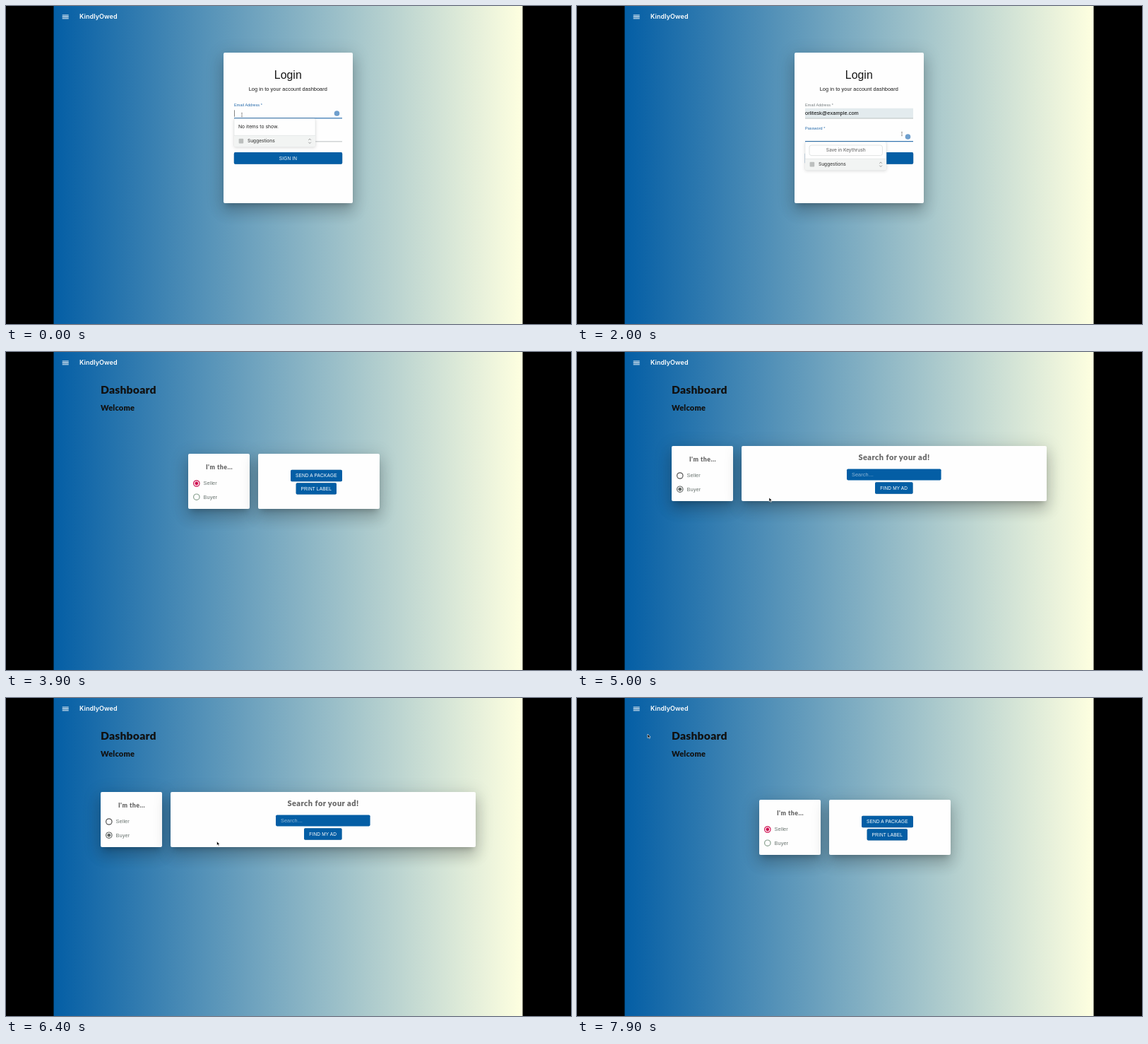
These frames come from a looping animation (800 by 450 pixels, 8000 ms). An HTML page:

```html
<!DOCTYPE html>
<html lang="en">
<head>
<meta charset="utf-8">
<title>Login and dashboard</title>
<style>
html, body { margin: 0; width: 100%; height: 100%; overflow: hidden; }
#page { position: absolute; inset: 0;
  background: linear-gradient(90deg, #000 67px, #045ea5 68px, #feffe0 731px, #000 732px); }
.card { position: absolute; background: #fefefe; border-radius: 2px;
  box-shadow: 0 5.5px 7.5px -3.5px rgba(0,0,0,.2), 0 12px 19px 1.5px rgba(0,0,0,.14), 0 4.5px 23px 4px rgba(0,0,0,.12); }
svg { position: absolute; left: 0; top: 0; }
text { font: 7.35px "Liberation Sans", Arial, sans-serif; letter-spacing: .07px; fill: #151515; }
.mid { text-anchor: middle; }
.head { font: 900 15.7px Lato, sans-serif; fill: #111; letter-spacing: .2px; }
.sub { font-size: 11px; }
.grey { fill: #666; letter-spacing: .45px; }
.label { font-size: 5.5px; }
.btn rect { fill: #045ea5; filter: drop-shadow(0 .5px .7px rgba(0,0,0,.3)); }
.btn text { font-size: 6.5px; letter-spacing: .18px; fill: #fff; text-anchor: middle; }
.pop text { font: 500 6.5px Inter, sans-serif; letter-spacing: 0; fill: #444; }
.pop #noItems { font-weight: 400; font-size: 6.8px; fill: #222; }
.pop > rect:first-child { filter: drop-shadow(0 1px 2px rgba(0,0,0,.14)); }
.choice { fill: #68736f; }
</style>
</head>
<body>
<div id="page"></div>
<div id="cards"></div>
<svg width="800" height="450" viewBox="0 0 800 450">
  <path d="M79.7 13h9M79.7 15.4h9M79.7 17.8h9" stroke="#fff" stroke-width="1.1"/>
  <text x="104" y="18.2" style="font:600 9px Inter,sans-serif;fill:#fff">KindlyOwed</text>

  <g id="login">
    <text class="mid" x="399.3" y="103.2" style="font-size:15.8px">Login</text>
    <text class="mid" x="399.3" y="120.4">Log in to your account dashboard</text>
    <rect id="filled" x="323" y="144.7" width="153" height="14" fill="#e3ebee"/>
    <text class="label" id="emailLabel" x="323" y="142.4">Email Address *</text>
    <text id="email" x="323" y="154.4" style="fill:#000">orlitesk@example.com</text>
    <rect id="emailLine" x="323" width="153"/>
    <text class="label" id="passLabel" x="323" y="175.4">Password *</text>
    <text id="pass" x="323" y="187.6"></text>
    <rect id="passLine" x="323" width="153"/>
    <g class="btn"><rect x="322.8" y="207.1" width="153.4" height="16.6" rx="1.8"/><text x="399.5" y="217.8">SIGN IN</text></g>
    <rect id="caret" width=".8" height="9.5" fill="#666"/>
    <g id="helper">
      <circle cx="468.5" cy="152" r="3.8" fill="#6f9fcd"/>
      <g class="pop">
        <rect x="323" y="159.5" width="115" height="39.8" rx="2" fill="#fefefe" stroke="#dfe3e3" stroke-width=".5"/>
        <path d="M323.3 183.3h114.4v14a1.8 1.8 0 0 1-1.8 1.8H325.1a1.8 1.8 0 0 1-1.8-1.8z" fill="#f2f4f3"/>
        <path d="M323 183.3h115" stroke="#d9dddd" stroke-width=".6"/>
        <rect x="329.6" y="187.8" width="6.6" height="6.6" rx="1" fill="#bcbfbe"/>
        <text x="342" y="193.4">Suggestions</text>
        <path d="M428.3 189.8l1.8-1.9 1.8 1.9M428.3 192.6l1.8 1.9 1.8-1.9" fill="none" stroke="#777" stroke-width=".7"/>
        <text id="noItems" x="329" y="173.4">No items to show.</text>
        <g id="save">
          <rect id="saveBox" x="329" y="164" width="103.5" height="14.6" rx="3"/>
          <text id="saveText" class="mid" x="380.7" y="173.4">Save in Keythrush</text>
        </g>
      </g>
    </g>
  </g>

  <g id="dash">
    <text class="head" x="134" y="59">Dashboard</text>
    <text class="head sub" x="134" y="82.6">Welcome</text>
    <g id="role">
      <text class="head grey mid" x="302" y="166" style="font-size:8.8px">I'm the...</text>
      <circle id="halo" cx="269.8" cy="186" r="9" fill="#000" opacity=".04"/>
      <g id="radios" fill="none" stroke-width="1.2">
        <circle cx="269.8" cy="186" r="4.2"/><circle cx="269.8" cy="205.2" r="4.2"/>
      </g>
      <circle id="dot" cx="269.8" r="2.4"/>
      <text class="choice" x="279.6" y="188.4">Seller</text>
      <text class="choice" x="279.6" y="207.6">Buyer</text>
    </g>
    <g id="seller" class="btn">
      <rect x="403" y="166.7" width="73" height="16.6" rx="1.8"/><text x="439.3" y="177.3">SEND A PACKAGE</text>
      <rect x="410.6" y="185.2" width="57.4" height="16.4" rx="1.8"/><text x="439.3" y="195.7">PRINT LABEL</text>
    </g>
    <g id="buyer">
      <text class="head sub grey mid" x="449" y="152.8">Search for your ad!</text>
      <rect x="382" y="165.4" width="133.6" height="16" rx="1.8" fill="#045ea5"/>
      <text x="389" y="175.8" style="fill:#8fb6d6">Search…</text>
      <g class="btn"><rect x="422" y="184.2" width="53.6" height="16.6" rx="1.8"/><text x="448.8" y="194.8">FIND MY AD</text></g>
    </g>
  </g>

  <g id="pointer">
    <path id="arrow" d="M0 0v5.6l1.4-1.2 1 2.1 1-.5-1-2h1.7z" fill="#000" stroke="#fff" stroke-width=".6"/>
    <path id="beam" d="M-.8-2.6h1.6M0-2.6v5.2M-.8 2.6h1.6" fill="none" stroke="#777" stroke-width=".7"/>
    <path id="hand" d="M-.5-2.5q.8-.9 1.2.2v1.9l2.4.7q.8.4.5 1.6l-.6 2.4H0L-2 1.6q.2-1 1.5-.1z" fill="#fff" stroke="#222" stroke-width=".7"/>
  </g>
</svg>
<script>
const LOOP = 8000, FILL = 400, FOCUS_PASS = 1500, SIGNED_IN = 3700, BUYER = 5000, SELLER = 7200;
const BLUE = '#1f66a8';
const $ = id => document.getElementById(id);
const show = (id, on) => { $(id).style.display = on ? '' : 'none'; };
const set = (id, attrs) => { for (const k in attrs) $(id).setAttribute(k, attrs[k]); };

// time, x, y of the pointer, eased between stops
const path = [
  [0, 334, 154], [300, 334, 154], [700, 340, 172], [1000, 344, 172], [1500, 460, 181], [4000, 460, 181],
  [4800, 271, 206], [5200, 273, 206], [5700, 288, 211], [6300, 310, 205], [6900, 155, 177],
  [7200, 155, 177], [7900, 100, 51], [8000, 100, 51]
];
function pointerAt(t) {
  const i = path.findIndex(p => p[0] > t), a = path[i - 1], b = path[i];
  let k = (t - a[0]) / (b[0] - a[0]);
  k = k * k * (3 - 2 * k);
  return [a[1] + (b[1] - a[1]) * k, a[2] + (b[2] - a[2]) * k];
}

const bursts = [[2100, 2500], [2700, 3000], [3300, 3500]];
const typedAt = t => bursts.reduce((n, [from, to]) =>
  n + (t < from ? 0 : Math.floor((Math.min(t, to) - from) / 100) + 1), 0);

function card(x, y, w, h) {
  return `<div class="card" style="left:${x}px;top:${y}px;width:${w}px;height:${h}px"></div>`;
}
const layouts = {
  login: card(308, 66, 183, 213),
  seller: card(258, 144, 87, 78) + card(357, 144, 172, 78),
  buyer: card(134, 133, 87, 78) + card(233, 133, 432, 78)
};
let layout;

function underline(id, bottom, focused) {
  const h = focused ? 1.1 : .6;
  set(id, { y: bottom - h, height: h, fill: focused ? BLUE : '#8b9496' });
}

function drawLogin(t, x, y) {
  const onPass = t >= FOCUS_PASS, filled = t >= FILL, typed = typedAt(t);
  const hover = !onPass && filled && y > 163 && y < 179 && x < 433;
  show('filled', filled);
  show('email', filled);
  $('emailLabel').style.fill = onPass ? '#737b7d' : BLUE;
  $('passLabel').style.fill = BLUE;
  show('passLabel', onPass);
  underline('emailLine', 159.3, !onPass);
  underline('passLine', 192.2, onPass);
  $('pass').textContent = '•'.repeat(typed);
  show('noItems', !filled);
  show('save', filled);
  set('saveBox', hover ? { fill: '#3d82c1', stroke: '#1c66ac', 'stroke-width': 1.2 }
                       : { fill: '#fefefe', stroke: '#d6dada', 'stroke-width': .7 });
  $('saveText').style.fill = hover ? '#e6f0f8' : '#707070';
  set('helper', { transform: `translate(0 ${onPass ? 33 : 0})` });

  const since = t - (onPass ? FOCUS_PASS : filled ? FILL : 0);
  show('caret', typed > 0 || since % 1000 < 500);
  const width = onPass ? (typed ? $('pass').getComputedTextLength() : 0)
                       : (filled ? $('email').getComputedTextLength() : 0);
  set('caret', { x: 323 + width, y: onPass ? 180.5 : 147.3 });
}

function drawDashboard(buying, hover) {
  show('seller', !buying);
  show('buyer', buying);
  show('halo', hover);
  set('halo', { cy: buying ? 186 : 205.2 });
  set('role', { transform: buying ? 'translate(-124 -11)' : '' });
  const [first, second] = $('radios').children;
  first.setAttribute('stroke', buying ? '#555' : '#cf0f50');
  second.setAttribute('stroke', buying ? '#606664' : '#87a08e');
  set('dot', { cy: buying ? 205.2 : 186, fill: buying ? '#606664' : '#cf0f50' });
}

function draw(t) {
  const inside = t >= SIGNED_IN, buying = t >= BUYER && t < SELLER;
  const next = !inside ? 'login' : buying ? 'buyer' : 'seller';
  if (next !== layout) $('cards').innerHTML = layouts[layout = next];
  show('login', !inside);
  show('dash', inside);

  const [x, y] = pointerAt(t);
  const overRole = inside && (buying ? x < 180 && y > 165 : t < BUYER && x < 300 && y > 195);
  const beam = !inside && (y < 159 || x > 438);
  set('pointer', { transform: `translate(${x} ${y})` });
  show('pointer', t < 2100 || t > 4000);
  show('beam', beam);
  show('hand', overRole);
  show('arrow', !beam && !overRole);

  if (inside) drawDashboard(buying, overRole);
  else drawLogin(t, x, y);
}

function tick() {
  draw(Math.floor(performance.now() % LOOP / 100) * 100);
  requestAnimationFrame(tick);
}
tick();
</script>
</body>
</html>
```
